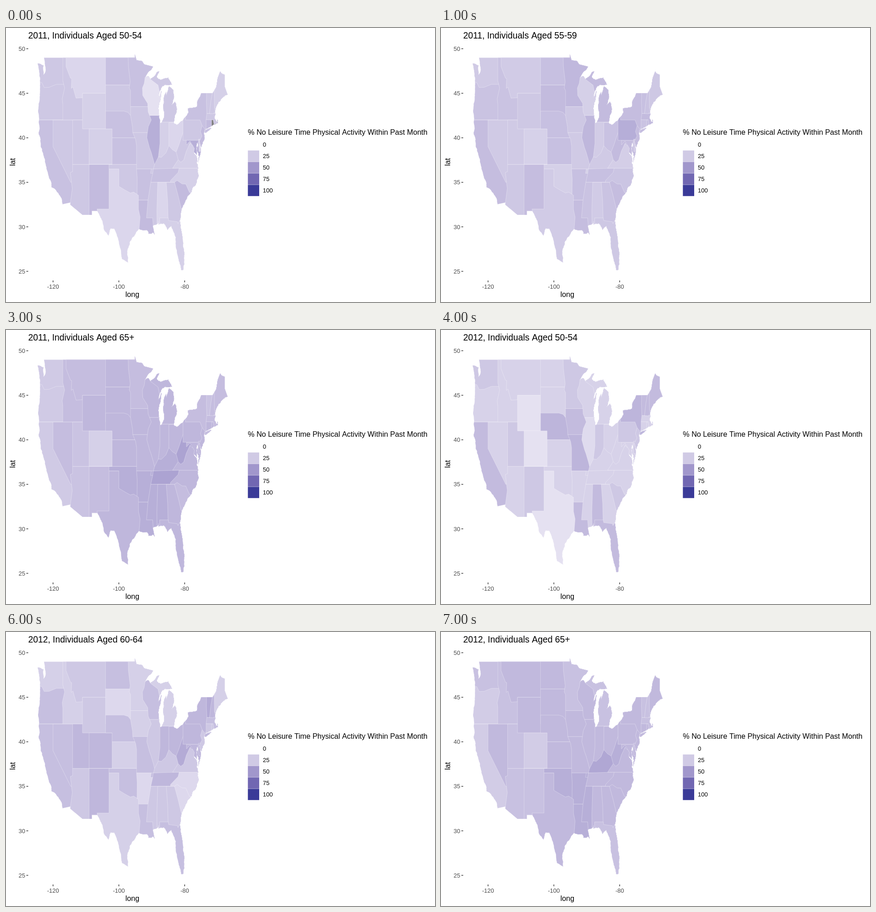
Recreate the animation shown at these times as an HTML page with a canvas. Size 937 px wide and 598 px high, loop 8 s.

```html
<!DOCTYPE html>
<html lang="en">
<head>
<meta charset="utf-8">
<title>Leisure time activity map</title>
<style>
html, body { margin: 0; width: 100%; height: 100%; overflow: hidden; background: #fff; }
canvas { display: block; }
</style>
</head>
<body>
<canvas id="stage" width="937" height="598"></canvas>
<script>
const ctx = document.getElementById("stage").getContext("2d");
const AGES = ["50-54", "55-59", "60-64", "65+"];
const SLOT_MS = 1000, EAST_EDGE = 66;

// Points are pairs of degrees west, degrees north.
const px = west => 102.7 + (120 - west) * 7.19;
const py = lat => 45.3 + (50 - lat) * 19.43;

// Key points of the outline, clockwise, with the roughness of each stretch.
const OUTLINE = [
  { rough: 0, at: [122.76,49, 95.15,49, 95.15,49.38, 94.6,48.72, 92.95,48.62, 92.3,48.25, 89.6,48] },
  { rough: 1, at: [91.3,47.25, 92.1,46.75, 91,46.92, 90.4,46.57, 89.1,46.95, 88.4,47.38, 87.8,47.47, 88.45,46.8, 87.4,46.52, 86.1,46.67, 85,46.77, 84.55,46.45, 83.85,45.97, 84.72,45.9] },
  { rough: 0.8, at: [86,45.95, 86.9,45.75, 87.65,45.1, 88,44.55, 87.05,45.28, 87.7,43.8, 87.9,43.1, 87.8,42.4, 87.4,41.65, 86.9,41.7, 86.25,42.4, 86.2,42.9, 86.53,43.7, 86.25,44.65, 85.6,45.18, 85.6,44.8, 85.05,45.4, 84.75,45.78] },
  { rough: 0.8, at: [83.45,45.35, 83.3,44.4, 83.9,43.7, 83,44.07, 82.65,43.85, 82.45,43, 83.4,41.72, 82.4,41.45, 80.5,41.98, 78.9,42.8, 79.05,43.27, 76.3,43.5, 76.2,44, 75,45] },
  { rough: 0, at: [71.5,45.01, 70.4,45.7, 70,46.7, 69.23,47.46, 68.8,47.22, 67.8,47.07, 67.8,45.7, 67,44.85] },
  { rough: 1, at: [68.8,44.4, 70.25,43.65, 70.82,42.87, 70.65,42.65, 71,42.3, 70.5,41.78, 70,41.78, 70.1,42.06, 69.97,41.65, 71.2,41.48, 71.86,41.32, 73.65,40.98, 74.2,40.5, 74.1,39.75, 74.9,38.93, 75.55,39.6, 75.1,38.75, 75.4,37.9, 75.95,37.15, 75.7,37.95, 76.25,38.6, 75.95,39.55, 76.45,39.1, 76.35,38.05, 77.2,38.4, 76.3,37.8, 76.35,37.1, 76,36.9] },
  { rough: 0.8, at: [75.75,35.7, 76.4,35.2, 76.6,34.7, 77.4,34.5, 77.9,33.95, 79.15,33.4, 80.9,32.03, 81.45,30.7, 80.55,28.45, 80.05,26.9, 80.1,25.8, 80.45,25.15, 81.1,25.15, 81.85,26.3, 82.7,27.7, 82.7,28.8, 84.05,30.1, 85.2,29.65, 86.3,30.38, 88,30.25, 87.95,30.6, 88.2,30.35, 89.6,30.15] },
  { rough: 1, at: [89.4,29.6, 89.1,29.1, 89.6,29.35, 90.2,29.2, 90.9,29.2, 91.4,29.6, 92.3,29.6, 93.84,29.75, 94.7,29.4, 95.3,28.95, 96.6,28.35, 97.4,27.3, 97.15,25.96] },
  { rough: 0.6, at: [99.1,26.4, 99.5,27.5, 100.65,29.1, 101.4,29.77, 102.5,29.8, 103.15,28.98, 104.5,29.65, 105,30.65, 106.53,31.78] },
  { rough: 0, at: [108.2,31.78, 108.2,31.33, 111.07,31.33, 114.81,32.5, 114.72,32.72, 117.12,32.53] },
  { rough: 0.8, at: [117.28,33, 118.45,33.8, 119.2,34.15, 120.5,34.45, 120.65,35.1, 121.9,36.4, 122.5,37.6, 123.75,39, 123.8,39.8, 124.35,40.4, 124.1,41, 124.5,42.84, 124,45, 123.95,46.2, 124.1,46.9, 124.7,48.38, 122.8,48.13, 122.9,47.1, 122.35,47.4, 122.5,48.5] }
];
const ISLAND = [{ rough: 0.6, at: [74.03,40.6, 73.7,40.87, 72.3,41.08, 71.9,41.07, 73.5,40.58] }];

// Only the western border of each state, north to south. A state reaches
// east until the next one is painted over it.
const BORDERS = {
  WA: [125,50, 125,45],
  OR: [118.98,46, 121.2,45.67, 122.7,45.65, 123.4,46.2, 125,46.25, 125,42],
  CA: [125,42, 125,32],
  NV: [120,42, 120,39, 114.63,35],
  ID: [117.03,50, 117.03,46.4, 116.47,45.6, 117.2,44.4, 117.03,43.8, 117.03,42],
  UT: [114.04,42, 114.04,37],
  MT: [116.05,50, 116.05,48, 114.7,46.7, 114.33,46.65, 114.45,45.55, 113.95,45.7, 113,44.45, 111.05,44.5, 111.05,45],
  WY: [111.05,45, 111.05,41],
  CO: [109.05,41, 109.05,37],
  AZ: [114.04,37, 114.04,36.2, 114.75,36.1, 114.15,34.3, 114.72,32.72, 115,31],
  NM: [109.05,37, 109.05,31],
  ND: [104.05,50, 104.05,45.93],
  SD: [104.05,45.93, 104.05,42],
  NE: [96.45,42.5, 97.2,42.85, 98.5,43, 104.05,43, 104.05,41, 102.05,41, 102.05,40],
  KS: [102.05,40, 102.05,37],
  TX: [103,36.5, 103,32, 106.63,32, 106.53,31.78, 108,25],
  OK: [103,37, 103,36.5, 100,36.5, 100,34.55, 98.1,34.13, 96.5,33.8, 95.5,33.9, 94.4,33.64],
  MN: [97.23,50, 97.1,48, 96.55,46.3, 96.85,45.6, 96.45,45.3, 96.45,43.5],
  IA: [96.45,43.5, 96.45,42.5, 95.85,41.2, 95.77,40.58],
  MO: [95.77,40.58, 94.9,39.8, 94.62,39.1, 94.62,36.5],
  AR: [89.7,36, 90.37,36, 90.15,36.5, 94.62,36.5, 94.43,35.4, 94.48,33.64, 94.04,33.55, 94.04,33],
  LA: [94.04,33, 94.04,31.95, 93.55,31.1, 93.85,29.7, 94,28.8],
  WI: [90.7,47.2, 92.05,46.73, 92.3,46.1, 92.85,45.6, 92.75,44.75, 91.25,43.85, 91.1,42.9, 90.65,42.5],
  IL: [90.65,42.5, 90.15,42, 91.05,41.25, 91.4,40.4, 91.5,40, 90.7,38.9, 90.2,38.4, 89.5,37.5, 89.15,36.98],
  MI: [90,47.6, 90.4,46.57, 88.1,45.92, 87.65,45.1, 86.9,45.45, 87.05,41.76],
  IN: [87.53,41.76, 87.53,39.35, 88,37.85, 88,37],
  OH: [80.6,42.2, 83.45,41.73, 84.81,41.71, 84.81,38],
  KY: [82.6,38.4, 83.7,38.65, 84.81,39.1, 85.7,38.3, 87.1,37.8, 88,37.85, 89.15,37, 89.5,36.5],
  TN: [81.68,36.59, 89.55,36.5, 89.7,36, 90.3,35],
  MS: [90.3,35, 91.15,33, 91.6,31, 89.73,31, 89.55,30],
  AL: [88.2,35, 88.45,31.9, 88.4,30],
  GA: [85.6,35, 85.18,32.87, 85,30.3],
  FL: [81.5,30.72, 82.05,30.36, 82.2,30.57, 84.86,30.7, 85,31, 87.6,31, 87.5,24],
  NC: [81.68,36.59, 82,36.1, 84.3,35.2, 84.32,35, 83.1,35, 80.5,33.5],
  SC: [78.55,33.86, 79.67,34.8, 80.8,34.82, 82.3,35.2, 83.1,35, 82,33.5, 81.1,32.1, 80.8,31.9],
  VA: [78,39.5, 81.97,37.54, 83.67,36.58],
  WV: [80.52,40.6, 81.75,39.2, 82.6,38.4, 81.97,37.54, 81.2,37.25, 80.3,37.5, 79.5,38.5, 78.35,39.4, 77.8,39.15],
  MD: [79.48,39.72, 79.48,39.2, 78.4,39.62, 77.5,39.1, 77.05,38.8, 77.25,38.4, 76.4,37.95],
  PA: [80.52,42.4, 80.52,39.72],
  DE: [75.79,39.84, 75.7,38.46],
  NJ: [74.7,41.36, 75.2,40.7, 74.75,40.2, 75.55,39.6, 74.95,38.85],
  NY: [79.76,45.1, 79.76,42, 75.35,42, 74.7,41.36, 73.9,41, 74.1,40.4],
  CT: [73.5,42.05, 73.5,41.2, 73.65,41],
  RI: [71.82,42.02, 71.82,41.2],
  MA: [73.27,42.73, 73.5,42.04, 71.38,42.02, 71.15,41.6, 71,41.2],
  VT: [73.35,45.1, 73.4,44, 73.27,42.73],
  NH: [71.5,45.3, 72.05,44.1, 72.46,42.72, 71.3,42.7, 70.85,42.88],
  ME: [71.08,48, 70.97,43.4, 70.7,43]
};

// Typical percentage per survey group, and the states that stand out by level.
const groups = [
  { usual: 26, missing: "RI", levels: { 14: "WI", 19: "MT TX OH AL DE", 22: "WY CO IN FL NC VA ME", 29: "CA NE KS MN AR TN NY ND", 32: "NM LA SC NJ CT", 38: "IL MD" } },
  null,
  { usual: 30, levels: { 18: "OK", 21: "CO", 24: "WA NV UT VA MD CT MO KY", 26: "AZ IA IN", 33: "CA NC NY VT", 38: "SD MN MI OH WV MA", 51: "PA" } },
  { usual: 34, levels: { 22: "CO", 25: "WA OR CA", 28: "UT AZ VT", 31: "ID MT NV NM MN MA NH NY SC ME", 38: "OK AR LA KY MS AL", 44: "TN WV" } },
  { usual: 21, levels: { 14: "WY CO TX", 17: "IL", 26: "WA UT NM MN IN PA NJ SC DE", 32: "CA IA LA AL FL VT NH ME", 35: "NE MO NY" } },
  null,
  { usual: 26, levels: { 18: "SD AR NC SC", 22: "WA ID TX MN IA MI ME KS", 30: "OR CA NV ND NE OK LA WI FL MO MA", 34: "UT CO NM IN OH TN PA NY MD DE NH", 40: "WV VT" } },
  { usual: 33, levels: { 24: "OR CA CO", 29: "WA ID UT AZ NM MN MI FL MA VT NH", 38: "OK AR LA MS WV", 42: "KY" } }
];

function percentOf(state, slot) {
  const group = groups[slot];
  // The 55-59 groups lie midway between their neighbours.
  if (!group) {
    const after = percentOf(state, slot + 1);
    return ((percentOf(state, slot - 1) ?? after) + after) / 2;
  }
  if (group.missing === state) return null;
  const level = Object.keys(group.levels).find(key => group.levels[key].includes(state));
  return Number(level ?? group.usual);
}

let seed = 11;
function random() {
  seed = (seed * 16807) % 2147483647;
  return seed / 2147483647;
}

// Midpoint displacement between two points, in pixels.
function wander(path, a, b, rough) {
  const dx = b.x - a.x, dy = b.y - a.y, length = Math.hypot(dx, dy);
  if (!rough || length < 3) return path.lineTo(b.x, b.y);
  const shift = (random() - 0.5) * rough * Math.min(0.25, 2.2 / length);
  const mid = { x: (a.x + b.x) / 2 - dy * shift, y: (a.y + b.y) / 2 + dx * shift };
  wander(path, a, mid, rough);
  wander(path, mid, b, rough);
}

function addShore(path, stretches) {
  let last = null;
  for (const { rough, at } of stretches)
    for (let i = 0; i < at.length; i += 2) {
      const next = { x: px(at[i]), y: py(at[i + 1]) };
      if (last) wander(path, last, next, rough);
      else path.moveTo(next.x, next.y);
      last = next;
    }
  path.closePath();
}

function statePath(border) {
  const path = new Path2D();
  for (let i = 0; i < border.length; i += 2) path.lineTo(px(border[i]), py(border[i + 1]));
  path.lineTo(px(EAST_EDGE), py(border.at(-1)));
  path.lineTo(px(EAST_EDGE), py(border[1]));
  path.closePath();
  return path;
}

const land = new Path2D();
addShore(land, OUTLINE);
addShore(land, ISLAND);
const states = Object.entries(BORDERS).map(([name, border]) => ({ name, path: statePath(border) }));

// White to dark blue, blended in CIE Lab.
function shade(percent) {
  if (percent === null) return "#7f7f7f";
  const t = percent / 100;
  const fy = (116 - 70.1 * t) / 116, fx = fy + 29.4 * t / 500, fz = fy + 51.6 * t / 200;
  const x = 0.9505 * fx ** 3, y = fy ** 3, z = 1.089 * fz ** 3;
  const channel = v => Math.round(255 * Math.min(1, 1.055 * Math.max(v, 0) ** (1 / 2.4) - 0.055));
  return `rgb(${channel(3.2406 * x - 1.5372 * y - 0.4986 * z)},${channel(1.8758 * y - 0.9689 * x + 0.0415 * z)},${channel(0.0557 * x - 0.204 * y + 1.057 * z)})`;
}

function text(str, x, y, size, color = "#000", align = "left") {
  ctx.font = `${size}px "Liberation Sans", Arial, sans-serif`;
  ctx.fillStyle = color;
  ctx.textAlign = align;
  ctx.fillText(str, x, y);
}

function drawMap(slot) {
  ctx.save();
  ctx.clip(land);
  ctx.lineWidth = 0.8;
  ctx.lineJoin = "round";
  ctx.strokeStyle = "rgba(255,255,255,0.4)";
  for (const { name, path } of states) {
    ctx.fillStyle = shade(percentOf(name, slot));
    ctx.fill(path);
    ctx.stroke(path);
  }
  ctx.stroke(land);
  ctx.restore();
}

function drawAxes() {
  const tick = "#333", label = "#4d4d4d";
  for (let lat = 25; lat <= 50; lat += 5) {
    text(lat, 42, py(lat) + 4.7, 13, label, "right");
    ctx.fillStyle = tick;
    ctx.fillRect(44.5, py(lat) - 0.7, 4, 1.4);
  }
  for (const west of [120, 100, 80]) {
    text("-" + west, px(west), 569, 13, label, "center");
    ctx.fillStyle = tick;
    ctx.fillRect(px(west) - 0.7, 551, 1.4, 4);
  }
  text("long", 276, 587, 16.1, "#000", "center");
  ctx.save();
  ctx.translate(20, 292.5);
  ctx.rotate(-Math.PI / 2);
  text("lat", 0, 0, 16.1, "#000", "center");
  ctx.restore();
}

function drawLegend() {
  text("% No Leisure Time Physical Activity Within Past Month", 528.3, 232.5, 16.15);
  for (let i = 0; i < 5; i++) {
    const top = 242.3 + i * 25;
    ctx.fillStyle = shade(i * 25);
    ctx.fillRect(528.3, top, 24.7, 24.5);
    text(i * 25, 561, top + 17, 13);
  }
}

function draw(slot) {
  ctx.fillStyle = "#fff";
  ctx.fillRect(0, 0, 937, 598);
  drawMap(slot);
  drawAxes();
  drawLegend();
  const year = 2011 + Math.floor(slot / AGES.length);
  text(`${year}, Individuals Aged ${AGES[slot % AGES.length]}`, 48.5, 22.5, 19.3);
}

let shown = -1;
function tick() {
  const slot = Math.floor(performance.now() / SLOT_MS) % groups.length;
  if (slot !== shown) draw(shown = slot);
  requestAnimationFrame(tick);
}
tick();
</script>
</body>
</html>
```
